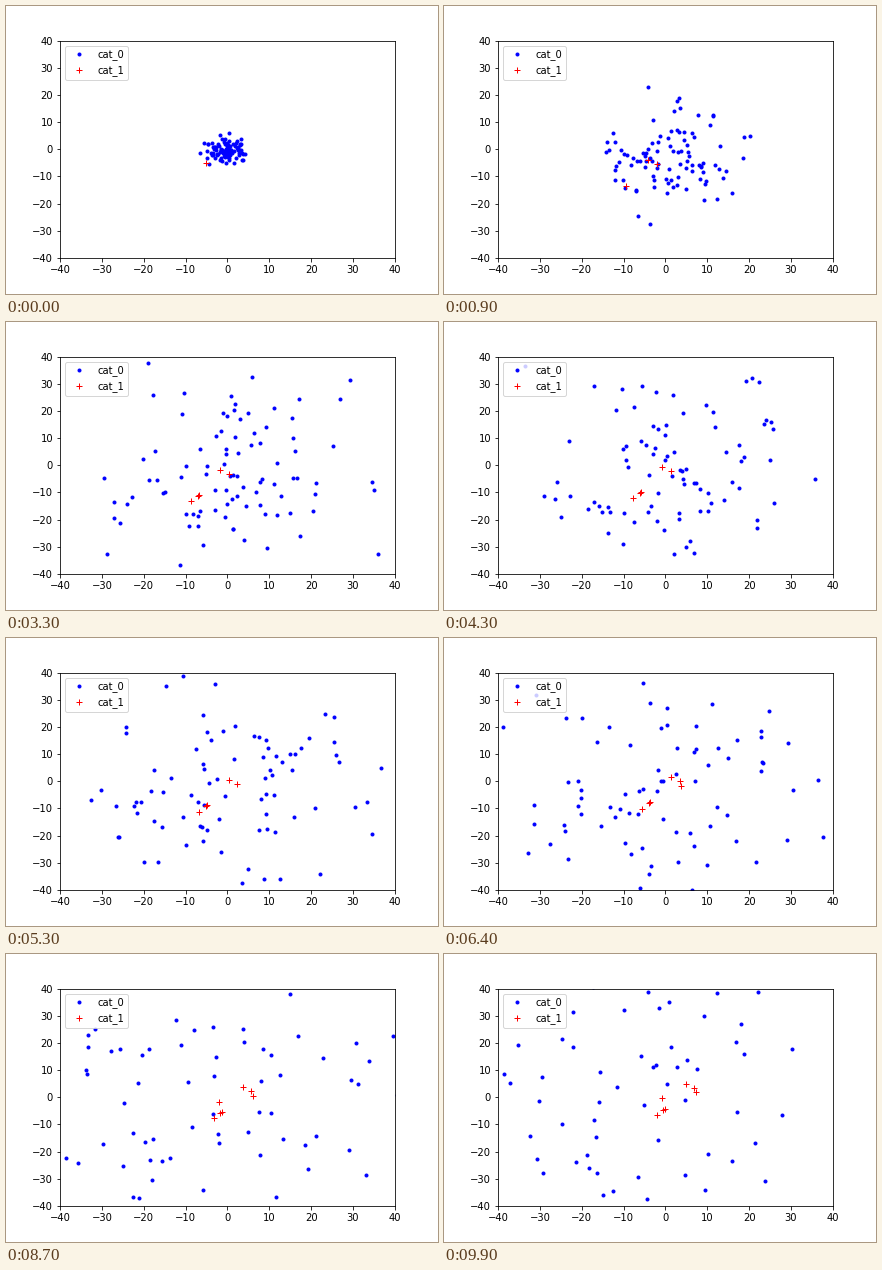
Animation, 432 px wide and 288 px high, one loop 10 s. Source, as a matplotlib script:

```python
import numpy as np
import matplotlib.pyplot as plt
from matplotlib.animation import FuncAnimation

FRAMES, INTERVAL = 100, 100
COUNT = 100
SPREAD, STEP = 2.6, 2.95  # deviation of the first cloud and of each step
DRIFT = 0.1               # cat_1 units per frame along the diagonal

# cat_1: frame of the switch, and where each drift line begins
SWITCH = np.array([0, 4, 8, 16, 28, 60, 68])
ORIGIN = np.array([(-5, -5), (-3, -6.4), (-10.4, -14.5), (-10.1, -14.1),
                   (-12, -16.5), (-2.6, -8.1), (-10.7, -10.3)])


def build_paths():
    """Random walks, the first few bent to meet their drift lines."""
    rng = np.random.default_rng(7)
    steps = rng.normal(0, STEP, (FRAMES, COUNT, 2))
    steps[0] *= SPREAD / STEP
    paths = steps.cumsum(axis=0)

    n = len(SWITCH)
    frames = np.arange(FRAMES)[:, None, None]
    lines = ORIGIN + DRIFT * frames
    gap = (lines - paths[:, :n])[SWITCH, np.arange(n)]
    bend = (frames + 1) / (SWITCH[:, None] + 1)
    walks = paths[:, :n] + gap * bend
    paths[:, :n] = np.where(frames < SWITCH[:, None], walks, lines)
    return paths


paths = build_paths()

fig, ax = plt.subplots(figsize=(6, 4), dpi=72)
fig.subplots_adjust(left=0.125, right=0.9, bottom=0.125, top=0.88)
ax.set(xlim=(-40, 40), ylim=(-40, 40))
cat_0, = ax.plot([], [], "b.", label="cat_0")
cat_1, = ax.plot([], [], "r+", label="cat_1")
ax.legend(loc="upper left")


def update(frame):
    switched = np.count_nonzero(SWITCH <= frame)
    cat_1.set_data(*paths[frame, :switched].T)
    cat_0.set_data(*paths[frame, switched:].T)
    return cat_0, cat_1


anim = FuncAnimation(fig, update, frames=FRAMES, interval=INTERVAL,
                     repeat=True, repeat_delay=0)
plt.show()
```
